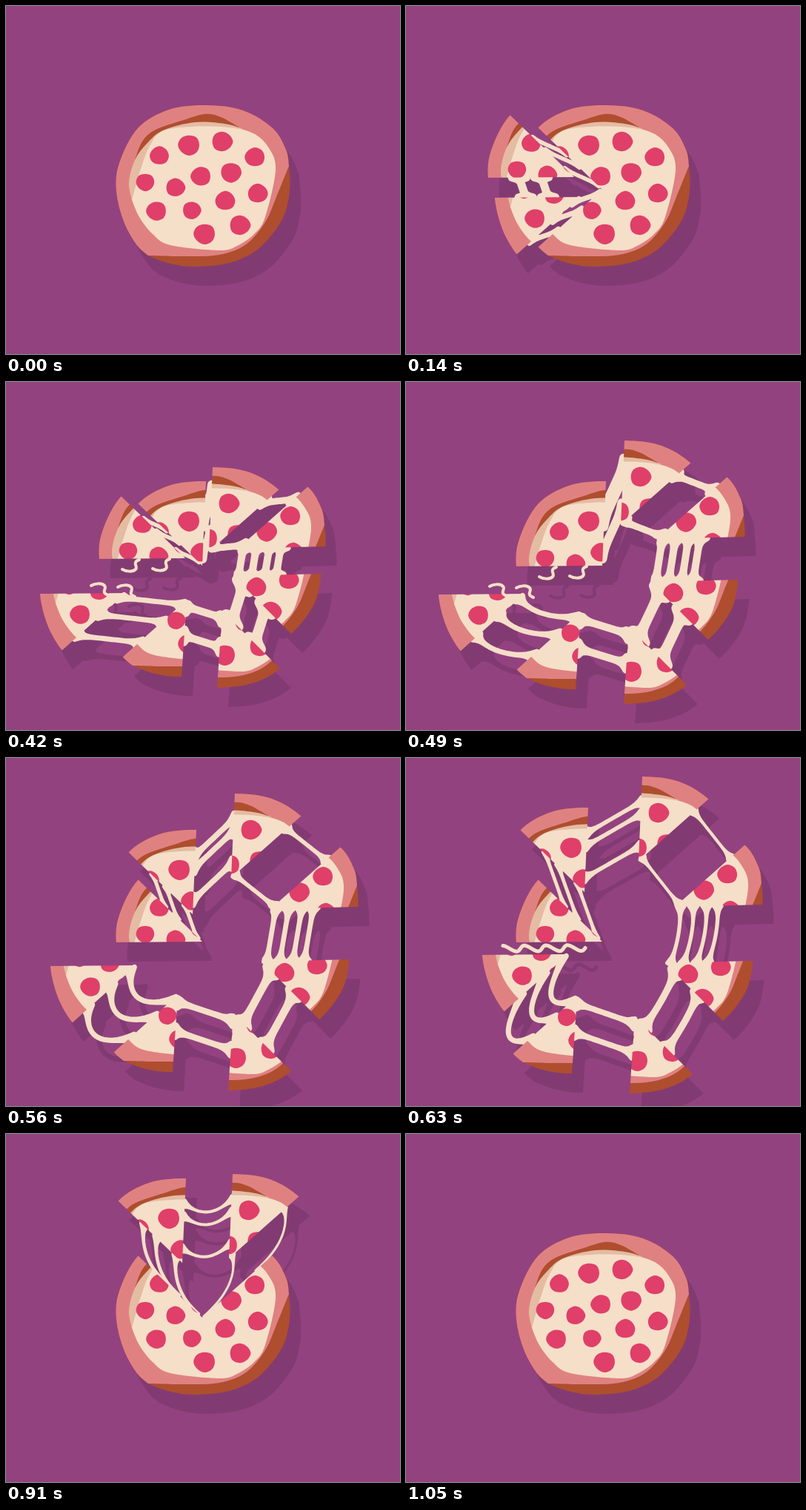
Recreate the animation shown at these times as an HTML page with a canvas. Size 532x470 px, loop 1120 ms.

```html
<!DOCTYPE html>
<html lang="en">
<head>
<meta charset="utf-8">
<title>Pizza</title>
<style>
  html, body { margin: 0; width: 100%; height: 100%; overflow: hidden; background: #934280; }
  canvas { display: block; }
</style>
</head>
<body>
<canvas id="stage" width="532" height="470"></canvas>
<script>
const canvas = document.getElementById('stage'), ctx = canvas.getContext('2d');
const LOOP = 1120, STEP = 70, QUARTER = Math.PI / 2;
const BG = '#934280', SHADOW = '#823b72', PINK = '#e08181', BROWN = '#ae4e2e',
      CREAM = '#f5dfc8', TAN = '#e4bba3', RED = '#e03f69';

// Smooth closed path through a flat list of points; a repeated point makes a corner.
function spline(flat) {
  const n = flat.length / 2, path = new Path2D();
  const pt = i => flat.slice(2 * ((i + n) % n), 2 * ((i + n) % n) + 2);
  path.moveTo(...pt(0));
  for (let i = 0; i < n; i++) {
    const [a, b, c, d] = [pt(i - 1), pt(i), pt(i + 1), pt(i + 2)];
    if (b[0] === c[0] && b[1] === c[1]) continue;
    path.bezierCurveTo(b[0] + (c[0] - a[0]) / 6, b[1] + (c[1] - a[1]) / 6,
      c[0] - (d[0] - b[0]) / 6, c[1] - (d[1] - b[1]) / 6, ...c);
  }
  return path;
}

// Slightly lumpy disc.
function blob([x, y, r], seed) {
  const pts = [];
  for (let i = 0; i < 8; i++) {
    const a = i * Math.PI / 4, k = r * (1 + 0.04 * Math.sin(i * 2.3 + seed * 4));
    pts.push(x + 1.03 * k * Math.cos(a), y + 0.98 * k * Math.sin(a));
  }
  return spline(pts);
}

const upperRim = [192,337, 192,337, 176,322, 159,291, 149,250, 153,212, 178,165, 220,140,
  270,134, 320,141, 360,165, 378,194, 382,216];
const rim = spline([...upperRim, 383,250, 373,288, 343,326, 305,346, 258,352, 222,348]);
const crust = spline([...upperRim, 382,216, 365,258, 350,292, 324,322, 288,336, 240,338]);
const wall = spline([174,208, 174,208, 184,183, 202,167, 240,154, 268,146, 290,150, 315,164,
  315,164, 215,180]);
const cheeseShade = spline([170,262, 170,262, 166,238, 174,208, 190,186, 212,168, 255,157,
  295,159, 320,166, 320,166, 230,200]);
const cheese = spline([170,262, 170,262, 182,220, 194,189, 211,169, 250,163, 300,164, 334,172,
  355,192, 364,222, 350,285, 335,308, 312,324, 288,330, 222,323, 198,308, 180,285]);
const toppings = [
  [207,202,12.5], [247,188,14], [292,183,13.5], [336,204,13], [188,238,12], [229,245,12.5],
  [263,230,13], [304,225,13.5], [340,253,13], [203,277,13], [251,276,12], [296,263,13],
  [268,308,14], [316,296,13.5]
].map(blob);

// The whole pizza is painted once, then cut up with clips.
const pizza = document.createElement('canvas');
pizza.width = canvas.width;
pizza.height = canvas.height;
const paint = pizza.getContext('2d');
for (const [path, color] of [[rim, BROWN], [crust, PINK], [wall, BROWN], [cheeseShade, TAN],
  [cheese, CREAM], ...toppings.map(p => [p, RED])]) {
  paint.fillStyle = color;
  paint.fill(path);
}

// Cuts run clockwise from the top; slice k lies between cut k and cut k + 1.
const CENTER = [265, 248];
// to: farthest offset, when: start, arrive, leave, home.
const slices = [
  { to: [56,-123], when: [385, 740, 740, 1050] },
  { to: [98,-47], when: [320, 630, 700, 910] },
  { to: [85,29], when: [315, 630, 660, 910] },
  { to: [44,101], when: [280, 620, 740, 910] },
  { to: [-34,74], when: [280, 605, 630, 813] },
  { to: [-105,38], when: [70, 466, 490, 687] },
  { to: [-51,-23], when: [0, 260, 280, 480] },
  { to: [-32,-88], when: [490, 745, 830, 1050] }
];
// end: outer end, at: where strings hang, thin/fat: width once stretched and the extra at first,
// sag: slack and the time it is greatest, tear: when a ragged seam shows.
const cuts = [
  { end: [270,134], at: [.7,.55,.17], thin: 4, fat: 8, sag: [0,14], slack: 910 },
  { end: [360,164], at: [.79,.05], thin: 3, fat: 6, sag: [13,0], slack: 910 },
  { end: [383,245], at: [.06,.21,.36,.49], thin: 4, fat: 6, sag: [12,0], slack: 770 },
  { end: [343,326], at: [.17,.56], thin: 8, fat: 6, sag: [6,4], slack: 770 },
  { end: [258,352], at: [.09,.47], thin: 7, fat: 3, sag: [0,0], slack: 0 },
  { end: [178,326], at: [.08,.38,.74], thin: 7, fat: 0, sag: [-22,22], slack: 630, tear: 770 },
  { end: [149,249], at: [.38,.64], thin: 11, fat: 0, sag: [0,0], slack: 0, until: 390, tear: 630 },
  { end: [178,164], at: [.6,.4,.1], thin: 4.5, fat: 1, sag: [-9,4], slack: 910 }
];
// Torn ends: slice, place, and which way up.
const hook = new Path2D('M0 0c5 3 14 4 18 0s-6-9 5-13');
const hooks = [[6,180,263,1], [6,221,262,1], [5,218,238,-1], [5,254,240,-1]];

const along = ([x, y], u) => [CENTER[0] + (x - CENTER[0]) * u, CENTER[1] + (y - CENTER[1]) * u];
const clamp = s => Math.max(0, Math.min(1, s));

const wedges = cuts.map((cut, k) => {
  const p = new Path2D();
  p.moveTo(...CENTER);
  p.lineTo(...along(cut.end, 1.6));
  p.lineTo(...along(cuts[(k + 1) % 8].end, 1.6));
  p.closePath();
  return p;
});

function offsetAt({ to, when: [start, arrive, leave, home] }, t) {
  const out = Math.sin(QUARTER * clamp((t - start) / (arrive - start)));
  const back = Math.cos(QUARTER * clamp((t - leave) / (home - leave)));
  return to.map(v => Math.round(v * out * back));
}

function drawPiece(clip, [dx, dy], shade) {
  ctx.save();
  ctx.translate(dx, dy);
  ctx.clip(clip);
  if (shade) ctx.fill(rim);
  else ctx.drawImage(pizza, 0, 0);
  ctx.restore();
}

function drawString(cut, u, a, b, t) {
  const width = cut.thin + cut.fat * Math.min(1, 2 ** ((490 - t) / 60));
  const slack = Math.cos(QUARTER * Math.min(1, Math.abs(t - cut.slack) / 180));
  const dx = cut.end[0] - CENTER[0], dy = cut.end[1] - CENTER[1], len = Math.hypot(dx, dy);
  const [x0, y0] = along(cut.end, u), flare = (width * 0.7 + 2) / len;
  const outer = [], inner = [];
  for (let i = 0; i <= 20; i++) {
    const s = i / 20, bow = 4 * s * (1 - s) * slack, w = flare * (2 * s - 1) ** 6;
    const x = x0 + a[0] + (b[0] - a[0]) * s + cut.sag[0] * bow;
    const y = y0 + a[1] + (b[1] - a[1]) * s + cut.sag[1] * bow;
    const v = Math.min(w, Math.max(0, u - width / 2 / len));
    outer.push([x + dx * w, y + dy * w]);
    inner.unshift([x - dx * v, y - dy * v]);
  }
  ctx.beginPath();
  for (const p of [...outer, ...inner]) ctx.lineTo(...p);
  ctx.closePath();
  ctx.lineWidth = width;
  ctx.fill();
  ctx.stroke();
}

function drawTear(cut, a, b) {
  ctx.beginPath();
  for (let u = 0; u <= 0.95; u += 0.02) {
    const [x, y] = along(cut.end, u), wave = 4 * Math.sin(u * 25);
    ctx.lineTo(x + (a[0] + b[0]) / 2 + wave / 2, y + (a[1] + b[1]) / 2 + wave);
  }
  ctx.lineWidth = 5;
  ctx.stroke();
}

function drawScene(t, shade) {
  const offsets = slices.map(s => offsetAt(s, t));
  const sides = k => [offsets[(k + 7) % 8], offsets[k]];
  ctx.save();
  if (shade) ctx.translate(15, 26);
  ctx.fillStyle = ctx.strokeStyle = shade ? SHADOW : CREAM;
  ctx.lineJoin = ctx.lineCap = 'round';

  cuts.forEach((cut, k) => {
    const [a, b] = sides(k);
    if (t >= (cut.until || LOOP) || Math.hypot(a[0] - b[0], a[1] - b[1]) < 1) return;
    for (const u of cut.at) drawString(cut, u, a, b, t);
  });

  // Slices at home share one clip so that no seam shows.
  const resting = new Path2D();
  offsets.forEach(([x, y], k) => {
    if (!x && !y) resting.addPath(wedges[k]);
  });
  drawPiece(resting, [0, 0], shade);
  offsets.forEach((o, k) => {
    if (o[0] || o[1]) drawPiece(wedges[k], o, shade);
  });

  cuts.forEach((cut, k) => {
    if (Math.abs(t - cut.tear) < 70) drawTear(cut, ...sides(k));
  });
  if (t > 390 && t < 560) {
    ctx.lineWidth = 4;
    for (const [k, x, y, flip] of hooks) {
      ctx.save();
      ctx.translate(x + offsets[k][0], y + offsets[k][1]);
      ctx.scale(1, flip);
      ctx.stroke(hook);
      ctx.restore();
    }
  }
  ctx.restore();
}

const start = performance.now();
function frame() {
  const t = Math.floor(((performance.now() - start) % LOOP) / STEP) * STEP;
  ctx.fillStyle = BG;
  ctx.fillRect(0, 0, canvas.width, canvas.height);
  drawScene(t, true);
  drawScene(t, false);
  requestAnimationFrame(frame);
}
frame();
</script>
</body>
</html>
```
